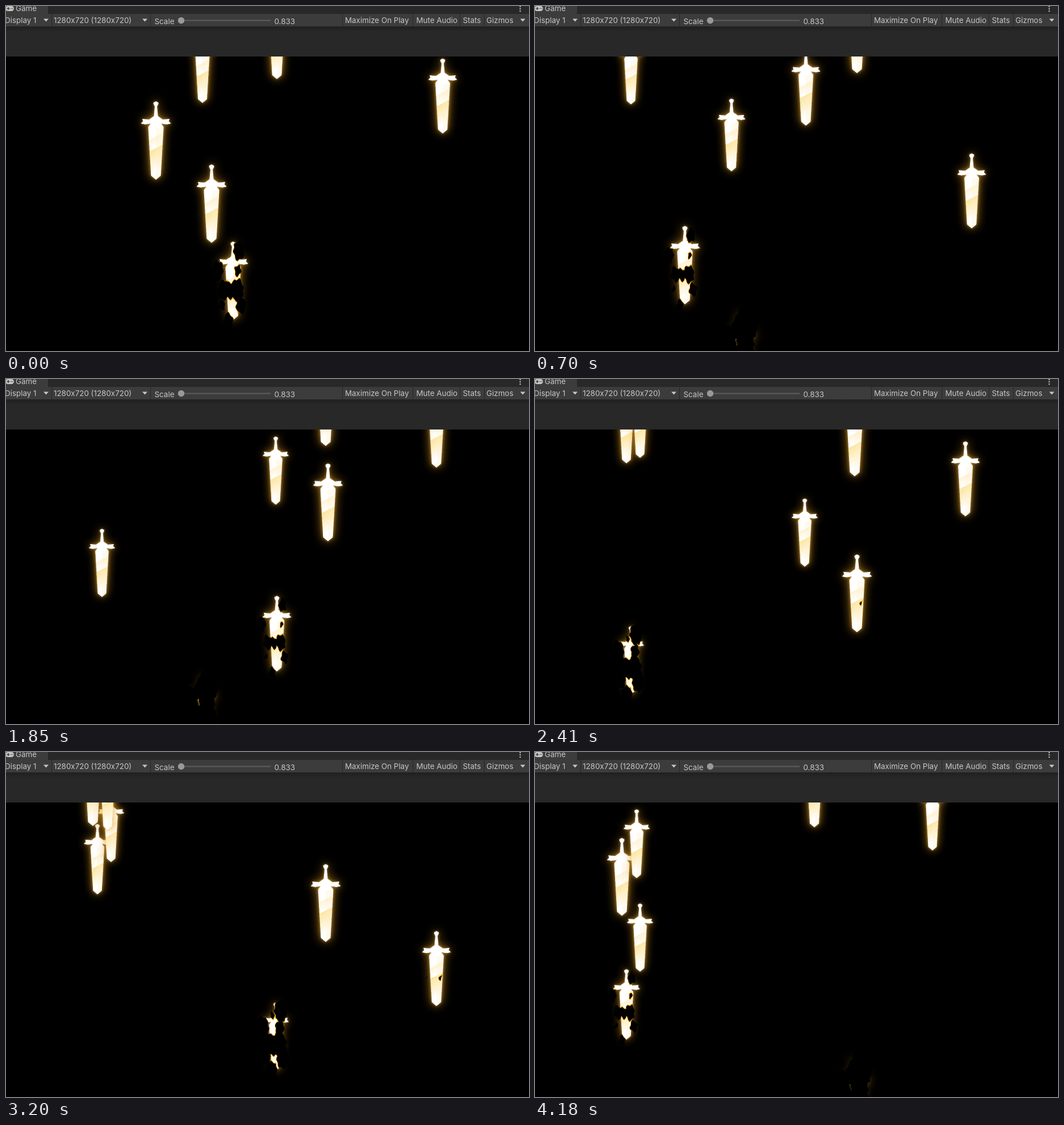
Write an HTML page with a canvas that moves like this. It is 921x608 px and loops after 4.23 s.

```html
<!DOCTYPE html>
<html lang="en">
<head>
<meta charset="utf-8">
<title>Falling swords</title>
<style>
  html, body { margin: 0; width: 921px; height: 608px; overflow: hidden; background: #000; }
  svg, canvas { position: absolute; left: 0; top: 0; display: block; }
  canvas { top: 89px; }
  text { font: 13.4px Inter, sans-serif; fill: #c6c6c6; }
</style>
</head>
<body>
<svg width="921" height="89">
  <defs>
    <linearGradient id="shade" x2="0" y2="1">
      <stop offset="0" stop-color="#1f1f1f"/><stop offset="1" stop-color="#282828"/>
    </linearGradient>
    <path id="arrow" d="M-4.5 0h9L0 5z"/>
  </defs>
  <rect width="921" height="89" fill="#282828"/>
  <path d="M0 0H74V14H921V36H0Z" fill="#3c3c3c"/>
  <rect y="36" width="921" height="9" fill="url(#shade)"/>
  <path d="M80.5 14v22M254.5 14v22M592.5 14v22M716.5 14v22M799.5 14v22M842.5 14v22" stroke="#272727"/>
  <rect x="-1" width="15" height="9" rx="4.5" fill="#c6c6c6"/>
  <path d="M1.5 4.5h5M4 2v5M8.5 4.5h1.4M11 4.5h1.2" stroke="#3c3c3c" stroke-width="1.5"/>
  <g fill="#c6c6c6">
    <use href="#arrow" x="70.5" y="22.5"/>
    <use href="#arrow" x="244.5" y="22.5"/>
    <use href="#arrow" x="910" y="22.5"/>
    <circle cx="905.5" cy="1" r="1.2"/><circle cx="905.5" cy="5" r="1.2"/><circle cx="905.5" cy="9" r="1.2"/>
  </g>
  <path d="M308 25.5H466" stroke="#5e5e5e" stroke-width="2"/>
  <circle cx="308.500" cy="25.5" r="5.7" fill="#999"/>
  <text x="17" y="9">Game</text>
  <text x="-2" y="30">Display 1</text>
  <text x="84" y="30">1280x720 (1280x720)</text>
  <text x="261.5" y="31.5">Scale</text>
  <text x="472.5" y="31.5">0.833</text>
  <text x="597" y="30">Maximize On Play</text>
  <text x="722.5" y="30">Mute Audio</text>
  <text x="804.5" y="30">Stats</text>
  <text x="846" y="30">Gizmos</text>
</svg>
<canvas id="stage" width="921" height="519"></canvas>
<script>
const LOOP = 4230, FIRST = -2316, GAP = 386.5, LIFE = 2650, FADE = 1950;
const UNIT = 138, RES = 2, OX = 40, OY = 20, W = 80 * RES, H = 180 * RES;

// x and height of each sword; a new one is born every GAP
const swords = [
  [400, 138], [362, 138], [264, 138], [769, 132], [346, 128], [477, 133],
  [169, 120], [567, 137], [475, 120], [758, 132], [563, 137], [161, 124],
  [185, 120], [153, 137], [179, 121], [700, 120], [492, 128]
];

// A nearer sword is taller, starts higher and falls faster on screen
const tipY = (h, age) => 335 - 1.64 * h + 6e-7 * h * age * age;

// Where and at what age the dissolve breaks through; all holes grow alike
const holes = [
  [10, 16, 2020], [8, 51, 2150], [-28, 51, 2000], [7, 85, 1970], [-6, 86, 2050],
  [-17, 85, 2000], [14, 112, 2040], [-9, 140, 2060], [-20, 112, 2150], [-7, 26, 2300]
];
const GROW_X = .032, GROW_Y = .055;

// Right half of the sword: pommel, grip, wing, blade
const half = 'L4 2 4.5 4 2 9 3.5 26 12 32 24 31 22.5 35 26.5 39 19 40.5 9 39 13.5 45 8.5 131 0 138';

function makeContext() {
  const c = document.createElement('canvas');
  c.width = W;
  c.height = H;
  return c.getContext('2d', { willReadFrequently: true });
}

function drawSprite() {
  const g = makeContext();
  const side = new Path2D('M0 0' + half + 'Z');
  const body = new Path2D(side);
  body.addPath(side, new DOMMatrix([-1, 0, 0, 1, 0, 0]));
  g.setTransform(RES, 0, 0, RES, OX * RES, OY * RES);
  g.fillStyle = '#fff';
  for (const [blur, color] of [[18, 'rgba(225,155,35,.8)'], [6, 'rgba(240,185,75,.55)']]) {
    g.shadowBlur = blur * RES;
    g.shadowColor = color;
    g.fill(body, 'nonzero');
  }
  g.shadowColor = 'transparent';
  g.clip(body);

  // Two slanted bands of shine, placed down the centre line
  const band = (from, to, color) => {
    const shine = g.createLinearGradient(0, from, (to - from) * .41, from + (to - from) * .78);
    shine.addColorStop(0, `rgba(${color},0)`);
    shine.addColorStop(.01, `rgb(${color})`);
    shine.addColorStop(1, `rgba(${color},0)`);
    g.fillStyle = shine;
    g.fillRect(-14, 40, 28, 100);
  };
  band(62, 80, '255,243,212');
  band(82, 122, '253,230,160');
  g.fillStyle = 'rgba(253,236,190,.25)';
  g.fillRect(0, 46, 14, 92);
  return g;
}

const sprite = drawSprite();
const pixels = sprite.getImageData(0, 0, W, H);
const scratch = makeContext();

// Age at which each pixel vanishes
const death = Float32Array.from({ length: W * H }, (_, i) => {
  const px = i % W / RES - OX, py = Math.floor(i / W) / RES - OY;
  const x = px + Math.sin(py * .45);
  const y = py + 2 * Math.sin(px * .6 + 1);
  return Math.min(LIFE, ...holes.map(([hx, hy, start]) =>
    start + Math.hypot((x - hx) / GROW_X, (y - hy) / GROW_Y)));
});

// Remove dead pixels and leave a burning rim
function dissolve(age) {
  const out = new ImageData(new Uint8ClampedArray(pixels.data), W, H), d = out.data;
  death.forEach((end, i) => {
    const left = end - age;
    if (left < 0) d[i * 4 + 3] = 0;
    else if (left < 28) d.set([250, 160 + left, 10 + left], i * 4);
  });
  scratch.putImageData(out, 0, 0);
  return scratch.canvas;
}

const ctx = document.getElementById('stage').getContext('2d');
ctx.imageSmoothingQuality = 'high';

function draw(t) {
  ctx.fillStyle = '#000';
  ctx.fillRect(0, 0, 921, 519);
  swords.forEach(([x, h], i) => {
    const age = t - FIRST - GAP * i;
    if (age < 0 || age > LIFE) return;
    const k = h / UNIT, top = tipY(h, age) - h - 89;
    const image = age > FADE ? dissolve(age) : sprite.canvas;
    ctx.drawImage(image, x - OX * k, top - OY * k, W / RES * k, H / RES * k);
  });
}

const begin = performance.now();
function frame() {
  draw(Math.max(0, performance.now() - begin) % LOOP);
  requestAnimationFrame(frame);
}
frame();
</script>
</body>
</html>
```
